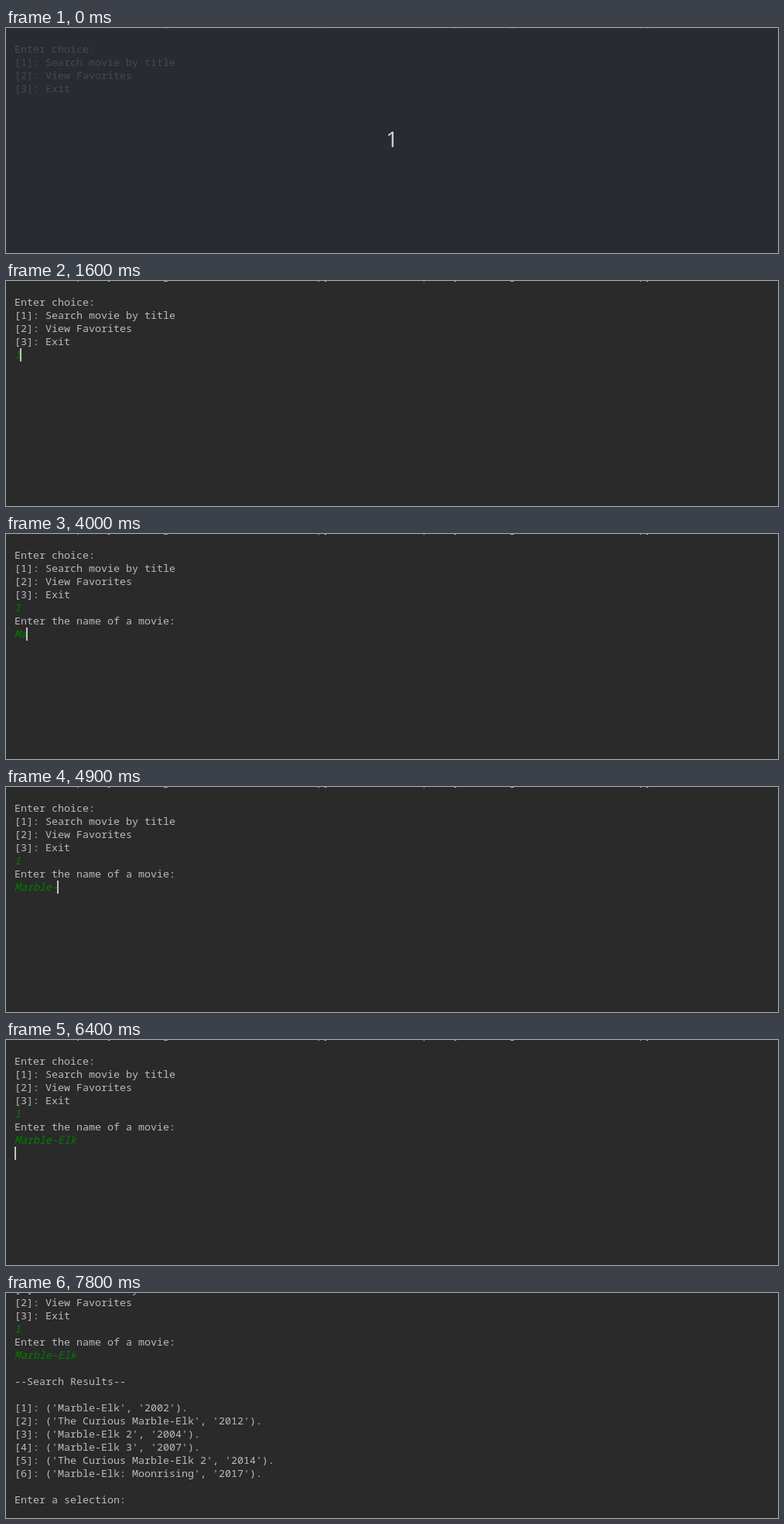
Animation of 998 by 291 pixels, one loop 8 s. Source, as an HTML page:

```html
<!DOCTYPE html>
<html lang="en">
<head>
<meta charset="utf-8">
<title>Movie search console</title>
<style>
html, body { margin: 0; width: 100%; height: 100%; overflow: hidden; background: #2a2a2a; }
svg { display: block; width: 998px; height: 291px; }
.log text { font: 13.333px "Noto Sans Mono", monospace; fill: #bbb; white-space: pre; }
.log text.input { font-style: italic; fill: #007f00; }
.count { font: 500 27.5px "Noto Sans", sans-serif; fill: #ccc; text-anchor: middle; }
</style>
</head>
<body>
<svg viewBox="0 0 998 291">
  <rect width="998" height="291" fill="#2a2a2a"/>
  <g class="log" id="log"></g>
  <rect id="caret" width="2" height="17" fill="#c4c4c4"/>
  <g id="intro">
    <rect width="998" height="291" fill="#282c34" opacity=".8"/>
    <text class="count" x="499" y="154">1</text>
  </g>
</svg>
<script>
const LOOP = 8000, LINE = 17, CHAR = 8, LEFT = 11, TOP = 19;
const $ = id => document.getElementById(id);
const log = $('log'), caret = $('caret'), intro = $('intro');

const TITLE = 'Marble-Elk';
const ROOT = '/home/dev/pantry/building/movies-client';
const movies = [
  [TITLE, 2002],
  [`The Curious ${TITLE}`, 2012],
  [`${TITLE} 2`, 2004],
  [`${TITLE} 3`, 2007],
  [`The Curious ${TITLE} 2`, 2014],
  [`${TITLE}: Moonrising`, 2017]
];

// Typing: [time, number of characters]
const choiceKeys = [[1600, 1]];
const titleKeys = [[3800, 1], [4000, 2], [4200, 3], [4300, 4], [4500, 5],
  [4600, 6], [4900, 7], [5900, 8], [6100, 10]];
// Caret row changes: [time, row]
const caretRows = [[0, 4], [2100, 5], [2200, 6], [6400, 7], [6900, 18]];
// Spans with the caret hidden
const hidden = [[0, 300], [800, 1300], [3300, 3700], [5700, 5900], [7800, LOOP]];

const latest = (steps, t) => steps.reduce((v, [at, next]) => t >= at ? next : v, 0);

function addLine(row, string, from = 0, input = false) {
  const node = document.createElementNS('http://www.w3.org/2000/svg', 'text');
  node.setAttribute('x', LEFT);
  node.setAttribute('y', TOP + row * LINE + 13);
  if (input) node.setAttribute('class', 'input');
  node.textContent = string;
  log.append(node);
  return { node, from };
}

const lines = [
  addLine(-2, `${ROOT}/venv/bin/python ${ROOT}/main.py`),
  addLine(0, 'Enter choice:'),
  addLine(1, '[1]: Search movie by title'),
  addLine(2, '[2]: View Favorites'),
  addLine(3, '[3]: Exit'),
  addLine(5, 'Enter the name of a movie:', 2200),
  addLine(8, '--Search Results--', 6900),
  ...movies.map(([name, year], i) =>
    addLine(10 + i, `[${i + 1}]: ('${name}', '${year}').`, 6900)),
  addLine(17, 'Enter a selection:', 6900)
];
const choice = addLine(4, '', 0, true).node;
const title = addLine(6, '', 0, true).node;

const show = (node, on) => node.setAttribute('visibility', on ? 'visible' : 'hidden');

function draw(t) {
  const scroll = t >= 6900 ? -49 : 0;
  const row = latest(caretRows, t);
  const typedChoice = latest(choiceKeys, t), typedTitle = latest(titleKeys, t);
  const col = row === 4 ? typedChoice : row === 6 ? typedTitle : 0;

  log.setAttribute('transform', `translate(0 ${scroll})`);
  lines.forEach(({ node, from }) => show(node, t >= from));
  choice.textContent = '1'.slice(0, typedChoice);
  title.textContent = TITLE.slice(0, typedTitle);

  caret.setAttribute('x', col ? LEFT - 1 + col * CHAR : LEFT);
  caret.setAttribute('y', TOP + row * LINE + scroll);
  show(caret, !hidden.some(([a, b]) => t >= a && t < b));
  show(intro, t < 300);
}

const start = performance.now();
function tick(now) {
  draw(Math.max(0, now - start) % LOOP);
  requestAnimationFrame(tick);
}
draw(0);
requestAnimationFrame(tick);
</script>
</body>
</html>
```
